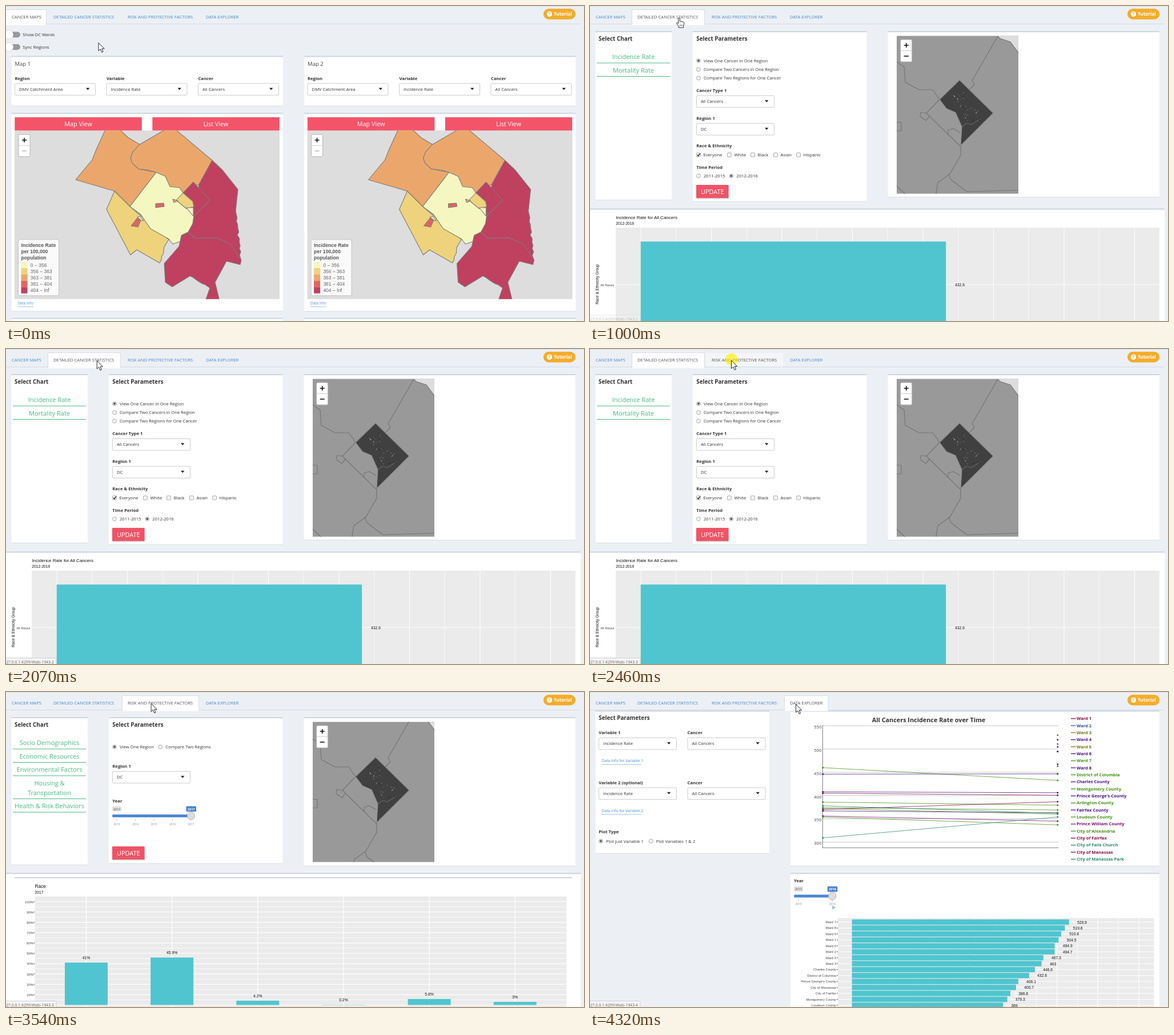
An HTML page that plays this animation: 1012 by 553 pixels, repeating every 5.88 s.

```html
<!DOCTYPE html>
<html lang="en">
<head>
<meta charset="utf-8">
<title>Cancer dashboard</title>
<style>
html, body { margin: 0; width: 100%; height: 100%; overflow: hidden; background: #ecf0f5; }
svg { display: block; width: 1012px; height: 553px; font-family: "Open Sans", "Noto Sans", sans-serif; }
.arial { font-family: "Liberation Sans", Arial, sans-serif; }
</style>
</head>
<body>
<svg id="stage" viewBox="0 0 1012 553" xmlns="http://www.w3.org/2000/svg"></svg>
<script>
const LOOP = 5880;
const TEAL = '#50c5cf', RED = '#f3546a', BLUE = '#4a80c8', LINK = '#4a87c7', EDGE = '#cdd5e1', INK = '#333';

// ---- drawing helpers: each returns SVG markup ----
const rect = (x, y, w, h, fill, more = '') =>
  `<rect x="${x}" y="${y}" width="${w}" height="${h}" fill="${fill}" ${more}/>`;
const line = (x1, y1, x2, y2, stroke, w = 1) =>
  `<path d="M${x1} ${y1}L${x2} ${y2}" stroke="${stroke}" stroke-width="${w}" fill="none"/>`;
const dot = (x, y, r, fill, more = '') => `<circle cx="${x}" cy="${y}" r="${r}" fill="${fill}" ${more}/>`;
const mark = (x, y, fill) => rect(x - 1.3, y - 1.3, 2.6, 2.6, fill);
const text = (x, y, s, size = 7.65, fill = INK, more = '') =>
  `<text x="${x}" y="${y}" font-size="${size}" fill="${fill}" ${more}>${s.replace(/&/g, '&amp;')}</text>`;
const bold = (x, y, s, size = 7.7, fill = INK, more = '') => text(x, y, s, size, fill, `font-weight="700" ${more}`);
const arial = (x, y, s, size, more = '', fill = '#111') => text(x, y, s, size, fill, `class="arial" ${more}`);
const mid = 'text-anchor="middle"', end = 'text-anchor="end"';
const range = (n, f) => Array.from({ length: n }, (_, i) => f(i)).join('');
const each = (list, f) => list.map(f).join('');

let seed = 7;
const rnd = () => (seed = seed * 16807 % 2147483647) / 2147483647;
const jitter = a => (rnd() * 2 - 1) * a;

const panel = (x, y, w, h) =>
  rect(x, y + 1, w, h, '#d9dee5') + rect(x, y, w, h, '#fff') + rect(x, y - 1, w, 2, EDGE);

const select = (x, y, w, s) =>
  rect(x + .5, y + .5, w - 1, 20.5, '#fff', 'stroke="#ccc" rx="1.5"') + text(x + 8, y + 13.4, s) +
  `<path d="M${x + w - 17} ${y + 8.2}h6.4l-3.2 3.8z" fill="#222"/>`;

const radio = (x, y, s, on) =>
  dot(x, y, 3.5, '#f4f4f4', 'stroke="#999" stroke-width=".8"') + (on ? dot(x, y, 2, '#555') : '') + text(x + 9, y + 2.8, s);

const check = (x, y, s, on) =>
  rect(x - 3.5, y - 3.5, 7, 7, '#f4f4f4', 'stroke="#999" stroke-width=".8" rx="1"') +
  (on ? `<path d="M${x - 2} ${y}l1.6 2 3-4.4" stroke="#222" stroke-width="1.4" fill="none"/>` : '') +
  text(x + 8.5, y + 2.8, s);

const button = y =>
  rect(186, y + 1.5, 57, 23, '#c9ccd2', 'rx="1"') + rect(186, y, 56.5, 23, '#ef5466', 'rx="1"') +
  text(214.3, y + 15.6, 'UPDATE', 11, '#fff', mid);

const link = (x, y, s, size, w) => text(x, y, s, size, '#4a90d9') + line(x - .5, y + 4, x - .5 + w, y + 4, '#7fb0e5', .8);

const zoom = (x, y, off) =>
  rect(x, y, 20, 39, '#fff', 'stroke="#b5b5b5" rx="2"') + line(x, y + 19.5, x + 20, y + 19.5, '#ccc') +
  `<path d="M${x + 6} ${y + 10}h8m-4 -4v8" stroke="#111" stroke-width="1.6"/>` +
  `<path d="M${x + 6} ${y + 29}h8" stroke="${off ? '#bbb' : '#111'}" stroke-width="1.6"/>`;

const slider = (x, xe, y, first, last, r) => {
  const gap = (xe - x - 8) / (last - first);
  return rect(x, y - 17, 16, 9, '#e1e1e1', 'rx="1.5"') + text(x + 8, y - 10, String(first), 5.2, '#444', mid) +
    rect(xe - 8.5, y - 17, 17.5, 9.6, BLUE, 'rx="1.5"') + bold(xe + .3, y - 10, String(last), 5.7, '#fff', mid) +
    rect(x, y - 2.5, xe - x, 5, '#4f88d0', 'rx="2"') +
    range(last - first + 1, i => line(x + 8 + i * gap, y + 5, x + 8 + i * gap, y + 9, '#bbb', .8) +
      text(x + 8 + i * gap, y + 16, String(first + i), 4.9, '#888', mid)) +
    dot(xe, y, r, '#ddd', 'stroke="#aaa" stroke-width=".8"');
};

// ---- page 1: two region maps ----
const scale = ['#f5f7c0', '#eed37c', '#eba76b', '#e0655c', '#c0405f'];

// Corner points of a region; "~" makes the next edge a ragged shore.
function region(level, outline) {
  const pts = [];
  let ragged = false;
  for (const word of outline.split(' ')) {
    if (word === '~') { ragged = true; continue; }
    const [x, y] = word.split(',').map(Number);
    if (ragged) {
      const [a, b] = pts[pts.length - 1], n = Math.round(Math.hypot(x - a, y - b) / 6);
      for (let i = 1; i < n; i++) pts.push([a + (x - a) * i / n + jitter(2), b + (y - b) * i / n + jitter(1.5)]);
      ragged = false;
    }
    pts.push([x, y]);
  }
  return `<polygon points="${pts.join(' ')}" fill="${scale[level]}"/>`;
}

// Painted in order, so neighbours cover each other's hidden edges.
const regions = [
  region(2, '174,217 158,252 151,270 122,305 190,325 217,352 263,292 232,286 218,267 234,243 214,231 199,217'),
  region(1, '190,325 217,352 285,410 281,416 ~ 269,451 229,428 218,437 176,357'),
  region(0, '217,352 263,292 300,300 310,328 329,369 327,383 319,397 308,402 306,413 292,418 285,409 253,391 236,366'),
  region(2, '234,243 282,215 296,216 361,271 338,313 310,328 304,319 287,317 279,299 263,292 249,288 232,286 221,276 218,267 222,256'),
  region(4, '361,271 379,288 406,322 402,360 ~ 411,444 368,407 331,408 319,397 327,382 329,369 338,313'),
  region(4, '319,397 331,408 368,407 393,418 412,446 410,454 386,448 366,485 374,518 349,518 357,495 ~ 322,474 291,493 279,485 277,452 303,422 307,403'),
  region(4, '328,309 357,341 329,369 327,343 310,328'),
  region(1, '310,328 327,343 329,352 316,356 298,341'),
  region(2, '292,339 301,342 294,345'),
  region(0, '316,354 328,354 328,369'),
  region(3, '262,347 276,346 277,352 262,354'),
  region(3, '219,386 230,372 236,376 231,388'),
  region(0, '230,371 234,369 241,377 236,376')
].join('');

const mapCard = n => `<g transform="translate(${(n - 1) * 512.6})">` +
  panel(9.5, 88.5, 475.5, 86.5) + text(15.5, 104.5, 'Map ' + n, 9.5, '#444') +
  each([['Region', 'DMV Catchment Area'], ['Variable', 'Incidence Rate'], ['Cancer', 'All Cancers']], ([s, v], i) =>
    bold(15.4 + 160.5 * i, 129.5, s) + select(15 + 160.5 * i, 135.5, 142, v)) +
  panel(9.5, 188.5, 475.5, 347) + rect(15, 218.5, 464, 296, '#ddd') +
  each(['Map View', 'List View'], (s, i) =>
    rect(15.3 + 241 * i, 195.3, 222.5, 23.3, RED) + text(126.5 + 241 * i, 211, s, 10.8, '#fff', mid)) +
  `<g clip-path="url(#land)" stroke="#7b7b7b" stroke-width="1.1" stroke-linejoin="round">${regions}</g>` +
  zoom(22, 225.5, true) +
  rect(21.5, 410, 71, 98.5, '#fff', 'fill-opacity=".85" stroke="#c4c4c4" rx="3"') +
  each(['Incidence Rate', 'per 100,000', 'population'], (s, i) =>
    arial(26.5, 422.5 + 11 * i, s, 8.6, 'font-weight="700"', '#555')) +
  each(['0 – 356', '356 – 363', '363 – 381', '381 – 404', '404 – Inf'], (s, i) =>
    rect(26.5, 449 + 11.1 * i, 11, 11.1, scale[i]) + arial(42.8, 457.6 + 11.1 * i, s, 8.5, '', '#666')) +
  link(20.5, 524, 'Data Info', 6.35, 28) + panel(9.5, 548.5, 475.5, 10) + '</g>';

const toggle = (y, s) => rect(4, y - 5, 21, 10, '#999', 'rx="5"') +
  dot(5, y, 7.7, '#fff', 'stroke="#d5d5d5" stroke-width=".8"') + text(29.3, y + 3, s);

const mapsPage = () => toggle(50.3, 'Show DC Wards') + toggle(72, 'Sync Regions') + mapCard(1) + mapCard(2);

// ---- pages 2 and 3 ----
const specks = range(26, i => {
  const north = i < 13;
  const x = north ? 638 + rnd() * 16 : 655 + rnd() * 28, y = north ? 147 + rnd() * 32 : 177 + rnd() * 24;
  return line(x, y, x + jitter(4), y + jitter(4), i % 3 ? '#777' : i % 2 ? '#e5e5e5' : '#1c1c1c', .9);
});
const district = '<path d="M714 53L718 57 736 63 758 93V30Z" fill="#ddd"/>' +
  `<g fill="none" stroke="#757575" stroke-width="1.2" stroke-linejoin="round">
  <path d="M758 93L736 63 718 57 714 53 669 131 673 138 664 147"/>
  <path d="M530 93L550 107 552 134 576 147 600 147 612 164 589 188 649 247"/>
  <path d="M589 188L579 187 578 194 588 201 594 194M530 204h15v15h-15M627 226v-8l9-3 12 7"/>
  <path d="M649 245V262L630 295 609 310 605 335M628 295L632 305 660 326 758 323M530 310L553 331"/>
  <path d="M647 130L706 188 649 245 651 212 640 187 624 180 612 164Z" fill="#404040" stroke="#8b8b8b"/>
  <path d="M651 212l8-6 9 2 16-10" stroke="#666"/></g>` + specks;

const mapPanel = (h, clip, dy) => panel(521.5, 45, 475.5, h) +
  `<g clip-path="url(#${clip})">${rect(537, 52, 213, 300, '#999')}<g transform="translate(0 ${dy})">${district}</g></g>` +
  zoom(543.7, 59, false);

// Each heading is one or two lines of text above a rule.
function chartList(h, names) {
  let y = 76.5;
  return panel(9.5, 45, 133.5, h) + bold(15, 61, 'Select Chart', 9.85) + each(names, name => {
    const rows = name.split('|');
    const out = each(rows, (s, i) => text(76, y + 16.5 + 17 * i, s, 11, '#49b885', mid));
    y += 6.5 + 17 * rows.length;
    return out + line(12, y, 140, y, '#49b885');
  });
}
const paramPanel = h => panel(180, 45, 304.5, h) + bold(186.3, 61, 'Select Parameters', 9.85);
const field = (y, s, v) => bold(186.3, y, s) + select(186, y + 6, 137, v);

const statsPage = () => chartList(295, ['Incidence Rate', 'Mortality Rate']) + paramPanel(298) +
  each(['View One Cancer in One Region', 'Compare Two Cancers in One Region', 'Compare Two Regions for One Cancer'], (s, i) =>
    radio(190, 96 + 15.3 * i, s, !i)) +
  field(151, 'Cancer Type 1', 'All Cancers') + field(199.6, 'Region 1', 'DC') +
  bold(186.3, 248.3, 'Race & Ethnicity') + check(190, 261.3, 'Everyone', true) +
  check(244, 261.3, 'White') + check(285, 261.3, 'Black') + check(325, 261.3, 'Asian') + check(365, 261.3, 'Hispanic') +
  bold(186.3, 285.8, 'Time Period') + radio(190, 298.3, '2011-2015') + radio(247.3, 298.3, '2012-2016', true) + button(314) +
  mapPanel(290, 'tall', 0) + panel(0, 356.5, 1006.5, 200) +
  arial(45.3, 374, 'Incidence Rate for All Cancers', 8) + arial(45.3, 384.3, '2012-2016', 6.7) +
  rect(45, 389, 952, 164, '#ebebeb') + range(15, i => line(89 + 61.75 * i, 389, 89 + 61.75 * i, 553, '#fff', i % 2 ? .7 : 1)) +
  line(42.5, 489, 997, 489, '#fff', 1.2) + rect(88.7, 413.5, 534.5, 140, TEAL) +
  arial(42.3, 491.7, 'All Races', 5.7, end, '#444') + arial(647.5, 492, '432.6', 6.8, mid) +
  `<g transform="translate(15.4 488.5) rotate(-90)">${arial(0, 0, 'Race & Ethnicity Group', 6.8, mid)}</g>`;

const riskPage = () => {
  const py = p => 549.5 - p * 1.815;
  return chartList(258, ['Socio Demographics', 'Economic Resources', 'Environmental Factors', 'Housing &|Transportation', 'Health & Risk Behaviors']) +
    paramPanel(255.5) + radio(190, 96.3, 'View One Region', true) + radio(270.3, 96.3, 'Compare Two Regions') +
    field(133, 'Region 1', 'DC') + bold(186.3, 193.8, 'Year') + slider(186, 324, 217.5, 2013, 2017, 6.7) + button(271) +
    mapPanel(260, 'short', -15.5) +
    panel(0, 318.5, 1006.5, 240) + rect(15, 325, 976, 2, EDGE) +
    arial(50.5, 344, 'Race', 8.2) + arial(50.5, 354, '2017', 6.7) + rect(50.5, 359, 931, 194, '#ebebeb') +
    range(21, i => line(50.5, py(i * 5), 981.5, py(i * 5), '#fff', i % 2 ? .7 : 1.2)) +
    range(10, i => arial(48, py(10 + i * 10) + 2.5, 10 + i * 10 + '%', 5.9, end, '#444') +
      line(48.5, py(10 + i * 10), 50.5, py(10 + i * 10), '#444')) +
    each([41, 45.9, 4.2, .2, 5.8, 3], (v, i) => {
      const x = 140.5 + 150.15 * i;
      return line(x, 359, x, 553, '#fff', 1.2) + rect(x - 37.5, py(v), 75, v * 1.815, TEAL) + arial(x, py(v) - 6, v + '%', 6.8, mid);
    });
};

// ---- page 4: data explorer ----
const ink = { r: '#850c45', b: '#2e4f93', o: '#747212', v: '#471088', g: '#459010', m: '#7a1074', t: '#2a886c' };
// colour, place, rate in 2016, rate in 2015
const places = [
  ['r', 'Ward 1', 504.5], ['b', 'Ward 2', 494.7], ['o', 'Ward 3', 463], ['v', 'Ward 4', 467.3],
  ['o', 'Ward 5', 510.8], ['v', 'Ward 6', 494.9], ['g', 'Ward 7', 529.9], ['v', 'Ward 8', 519.8],
  ['g', 'District of Columbia', 432.6, 460], ['v', 'Charles County', 446.6, 446], ['g', 'Montgomery County', 379.3, 386],
  ['v', "Prince George's County", 406.1, 408], ['g', 'Arlington County', 360, 372], ['v', 'Fairfax County', 363, 367],
  ['g', 'Loudoun County', 369, 374], ['m', 'Prince William County', 345, 356], ['g', 'City of Alexandria', 337, 354],
  ['r', 'City of Fairfax', 386.8, 370], ['t', 'City of Falls Church', 354, 309], ['r', 'City of Manassas', 400.7, 405],
  ['t', 'City of Manassas Park', 362, 378]];

const trendChart = () => {
  const vy = v => 59.3 + (550 - v) * .8167;
  return range(6, i => line(407, vy(550 - 50 * i), 820, vy(550 - 50 * i), '#c6c6c6') +
      text(405.3, vy(550 - 50 * i) + 4.7, String(550 - 50 * i), 7.7, '#444', end)) +
    line(407.3, 58, 407.3, 274, '#777') + line(407, 273.5, 820, 273.5, '#888') +
    each(places, ([c, s, now, past], i) => {
      const y = 46.7 + 12.34 * i;
      return (past ? line(407, vy(past), 819, vy(now), ink[c], .75) + mark(407.8, vy(past), ink[c]) : '') + mark(818.8, vy(now), ink[c]) +
        line(842, y, 850.5, y, ink[c], 1.3) + bold(852, y + 2.5, s, 7.6, ink[c]);
    });
};

const rankChart = () => rect(434, 397, 553.5, 156, '#ebebeb') +
  range(15, i => line(459 + 35.85 * i, 397, 459 + 35.85 * i, 553, '#fff', i % 2 ? .7 : 1.1)) +
  each([...places].sort((a, b) => b[2] - a[2]).slice(0, 15), ([, s, v], i) => {
    const y = 403.9 + 10.43 * i, w = v * .7175;
    return line(434, y, 987, y, '#fff') + rect(458.5, y - 4.7, w, 9.4, TEAL) + line(432, y, 434, y, '#444') +
      arial(431, y + 2.1, s, 5.85, end, '#444') + arial(472.7 + w, y + 2.6, String(v), 6.75);
  });

const explorerPage = () => panel(9.5, 33.5, 304.5, 249.5) + bold(15.3, 49, 'Select Parameters', 9.85) +
  each(['Variable 1', 'Variable 2 (optional)'], (s, i) => {
    const y = 87.5 * i;
    return bold(15.3, 74 + y, s) + bold(170.5, 74 + y, 'Cancer') + select(15, 80 + y, 137, 'Incidence Rate') +
      select(170.5, 80 + y, 137, 'All Cancers') + link(20.5, 123.2 + y, 'Data Info for Variable ' + (i + 1), 6.75, 70);
  }) +
  bold(15.3, 248.3, 'Plot Type') + radio(19, 261.8, 'Plot just Variable 1', true) + radio(106.7, 261.8, 'Plot Variables 1 & 2') +
  panel(351, 33.5, 646, 271.5) + bold(593, 53, 'All Cancers Incidence Rate over Time', 10.85, INK, mid) + trendChart() +
  panel(351, 318.5, 646, 240) + bold(357, 334, 'Year') + slider(357, 424.3, 358.2, 2015, 2016, 6.8) +
  '<path d="M424 374.5l6.5 3.8-6.5 3.8z" fill="#a3c3e8"/>' + rankChart();

// ---- tabs, status bar, pointer ----
const tabs = [[-1, 71, 10, 'CANCER MAPS'], [73, 201, 83, 'DETAILED CANCER STATISTICS'],
  [203, 338, 213, 'RISK AND PROTECTIVE FACTORS'], [340, 417.5, 350, 'DATA EXPLORER']];
const tabBar = (active, hover) => line(0, 31.5, 1006, 31.5, '#d5dae2') + each(tabs, ([a, b, x, s], i) => {
  const on = i === active, lit = on || i === hover;
  return (on ? rect(a + .5, 6.5, b - a - 1, 26, '#fff', 'stroke="#d9dde3"') + rect(a + 1, 31, b - a - 2, 2.5, '#fff')
    : lit ? rect(a, 7, b - a, 24, '#f4f5f7') : '') + text(x, 22, s, 7.7, lit ? '#555' : LINK);
});

const tutorial = () => rect(941, 4.8, 56, 18.8, '#f5ac29', 'rx="9.4"') + dot(951.5, 14.1, 4.7, '#fff') +
  bold(951.5, 17, '?', 8, '#f5ac29', mid) + bold(959, 17.3, 'Tutorial', 8.15, '#fff');

const outline = 'fill="#fff" stroke="#111" stroke-width=".9" stroke-linejoin="round"';
const arrow = `<path d="M0 0V14.3L3.3 11.3 5.7 16.8 8 15.8 5.7 10.5H10.2Z" ${outline}/>`;
const hand = `<path d="M-1.3 1Q0 -.8 1.3 1V6.6L5.8 7 8 8Q9 8.6 8.8 10L7.6 14.5V17.5H-.6V15.5L-4.6 10Q-4.4 8 -2.6 9L-1.3 10.4Z" ${outline}/>` +
  '<path d="M1.3 12v3m2-3v3m2-3v3" stroke="#333" stroke-width=".7"/>';

const clip = (id, x, y, w, h) => `<clipPath id="${id}">${rect(x, y, w, h, '#000')}</clipPath>`;
const stage = document.getElementById('stage');
stage.innerHTML = '<defs>' + clip('land', 15, 218.5, 464, 296) + clip('tall', 537, 52.5, 213, 277) + clip('short', 537, 52.5, 213, 246) + '</defs>' +
  rect(0, 0, 1012, 553, '#ecf0f5') + rect(0, 0, 1012, 1, '#d9dee6') +
  each([mapsPage, statsPage, riskPage, explorerPage], f => `<g class="page">${f()}</g>`) +
  '<g id="tabs"></g>' + tutorial() + '<g id="status"></g><g id="pointer"></g>';
const pages = stage.querySelectorAll('.page');
const [tabsEl, statusEl, pointerEl] = ['tabs', 'status', 'pointer'].map(id => document.getElementById(id));

// The pointer rests at these stops and glides to the next one.
const STEP = 76;
const stops = [{ x: 162, y: 64.5 }, { x: 156, y: 20.5, from: 530, to: 910 },
  { x: 247.5, y: 20, from: 2070, to: 2460 }, { x: 360.5, y: 21.5, from: 3540, to: 3850 }];
const opens = [1000, 2610, 4320];
const clicks = [[910, 1000], [2460, 2610], [4170, 4250]];
const ease = p => p * p * p * (10 - 15 * p + 6 * p * p);

function pointerAt(t) {
  let { x, y } = stops[0];
  for (const s of stops.slice(1)) {
    if (t < s.from) break;
    const n = Math.floor((s.to - s.from) / STEP) + 1;
    const p = ease(Math.min(1, (Math.floor((t - s.from) / STEP) + 1) / n));
    x += (s.x - x) * p;
    y += (s.y - y) * p;
  }
  return [x, y];
}

let last = '';
function draw(t) {
  const page = opens.filter(o => t >= o).length;
  const [x, y] = pointerAt(t);
  const hover = y < 32 ? tabs.findIndex(([a, b]) => x >= a - 2 && x <= b) : -1;
  const click = clicks.some(([a, b]) => t >= a && t < b);
  const shown = t < 1000 ? 0 : t < 1060 ? .35 : 1;
  const isHand = hover > 0 && t < 2070;
  const key = [page, x, y, click, shown, isHand].join();
  if (key === last) return;
  last = key;
  pages.forEach((p, i) => p.style.display = i === page ? '' : 'none');
  tabsEl.innerHTML = tabBar(page, hover);
  statusEl.setAttribute('opacity', shown);
  statusEl.innerHTML = rect(-2, 542.5, 90, 12, '#f5f5f5', 'stroke="#cfcfcf" rx="1.5"') +
    text(84, 551.6, `127.0.0.1:4299/#tab-1943-${hover + 1}`, 6.85, '#666', end);
  pointerEl.innerHTML = (click ? dot(x + .3, y - 1.5, 11, '#fff000', 'opacity=".62"') : '') +
    `<g transform="translate(${x} ${y})">${isHand ? hand : arrow}</g>`;
}

const start = performance.now();
function tick(now) {
  draw(Math.max(0, now - start) % LOOP);
  requestAnimationFrame(tick);
}
draw(0);
requestAnimationFrame(tick);
</script>
</body>
</html>
```
